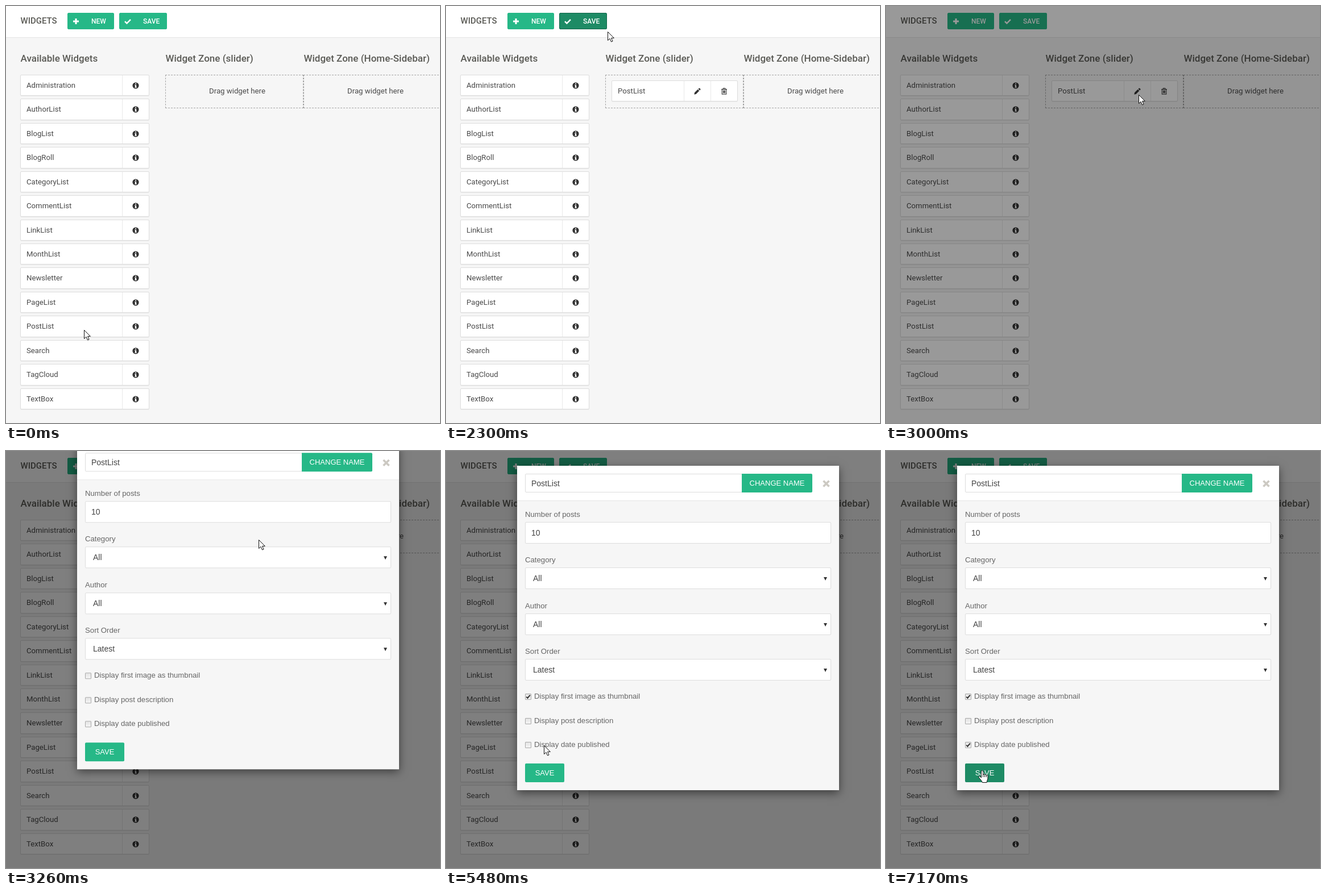
An HTML page that plays this animation: 763 by 734 pixels, repeating every 7.24 s.

```html
<!DOCTYPE html>
<html lang="en">
<head>
<meta charset="utf-8">
<title>Widgets</title>
<style>
  html, body { margin: 0; width: 100%; height: 100%; overflow: hidden; }
  #stage { position: relative; width: 763px; height: 734px; overflow: hidden; background: #f6f6f6;
    font: 13.2px Roboto, sans-serif; color: #4a4a4a; }
  #stage * { box-sizing: border-box; }
  #stage div, #stage svg { position: absolute; white-space: nowrap; }
  .header { left: 0; top: 0; width: 763px; height: 56px; background: #fff; border-bottom: 1px solid #e4e4e4; }
  .heading { font-weight: 500; font-size: 17px; line-height: 24px; top: 80px; color: #5a5a55; }
  .title { left: 25.5px; top: 14px; font-weight: 500; font-size: 15px; line-height: 24px; color: #5a5a55; }
  .btn { background: #26b887; color: #fff; border-radius: 2px; }
  .tool { top: 12px; height: 29px; font-weight: 500; font-size: 12px; line-height: 30px; border: 1px solid #26b887; }
  .tool div { top: -1px; }
  .tool svg { top: 8px; width: 12px; height: 12px; }
  .dark { background: #1e8b65; border-color: #12664a; }
  .card { height: 37.43px; line-height: 36px; background: #fff; border: 1px solid #ddd; border-radius: 2px;
    box-shadow: 0 1px 1px rgba(0, 0, 0, .05); }
  .card .name { left: 10px; top: 0; }
  .cell { top: 0; bottom: 0; width: 47px; border-left: 1px solid #e8e8e8; }
  .cell svg { left: 17px; top: 12px; width: 12px; height: 12px; }
  .zone { top: 121px; width: 243px; height: 59px; border: 1px dashed #a5a5a5; }
  .zone .hint { left: 10px; right: 0; bottom: 19px; line-height: 20px; text-align: center; }
  .slot { left: 291px; top: 131px; width: 222px; height: 38px; border: 1px dashed #a5a5a5; }
  #shade { inset: 0; background: #000; }
  #modal { left: 125px; top: 26px; width: 566px; height: 571px; background: #f6f6f6;
    box-shadow: 0 5px 15px rgba(0, 0, 0, .5); font: 13.2px "Liberation Sans", Arial, sans-serif; color: #666; }
  #modal .bar { left: 0; top: 0; width: 566px; height: 62px; background: #fff; border-bottom: 1px solid #e5e5e5; }
  .field { left: 14px; width: 538px; height: 38px; line-height: 37px; padding-left: 10px; font-size: 14px;
    color: #444; background: #fff; border: 1px solid #ddd; border-radius: 2px; }
  .select { padding-left: 13px; }
  .select::after { content: ""; position: absolute; right: 6px; top: 16px;
    border: 3px solid transparent; border-top: 6px solid #333; border-bottom: 0; }
  .label { left: 14px; line-height: 20px; }
  .check { left: 14px; width: 11px; height: 11px; border: 1px solid #a9a9a9; border-radius: 1px;
    background: linear-gradient(#e4e4e4, #f4f4f4); }
  .check svg { left: 0; top: 0; width: 9px; height: 9px; }
  .btn.big { text-align: center; font-size: 13px; line-height: 34px; height: 33px; }
  #spot { width: 23px; height: 23px; margin: -11.5px; border-radius: 50%; background: rgba(252, 245, 50, .8); }
  .pointer { overflow: visible; width: 18px; height: 23px; }
  .pointer path { fill: #fff; stroke: #111; stroke-linejoin: round; }
</style>
</head>
<body>
<svg width="0" height="0" style="position:absolute">
  <symbol id="info" viewBox="0 0 12 12"><circle cx="6" cy="6" r="5.6" fill="#333"/>
    <path d="M5 1.9h2.1v1.7H5zM4.3 4.7h2.8v3.8h.7v1.2H4.3V8.5H5V5.9h-.7z" fill="#fff"/></symbol>
  <symbol id="pencil" viewBox="0 0 12 12"><path d="M.3 11.7l.8-3.4 5.6-5.6 2.6 2.6-5.6 5.6zM7.5 1.9l1.2-1.2q.6-.5 1.2 0l1.4 1.4q.5.6 0 1.2l-1.2 1.2z" fill="#333"/></symbol>
  <symbol id="trash" viewBox="0 0 12 12"><path d="M1.2 2.6h9.6M4.3 2.4V.8h3.4v1.6M2.3 2.8v8.4h7.4V2.8M4.6 4.6v4.8M6 4.6v4.8M7.4 4.6v4.8" fill="none" stroke="#333" stroke-width="1.1"/></symbol>
  <symbol id="plus" viewBox="0 0 12 12"><path d="M6 1v10M1 6h10" stroke="#fff" stroke-width="3"/></symbol>
  <symbol id="tick" viewBox="0 0 12 12"><path d="M1 6.2l3.4 3.4L11 2.9" fill="none" stroke="#fff" stroke-width="2.5"/></symbol>
  <symbol id="mark" viewBox="0 0 9 9"><path d="M1.2 4.6l2.2 2.4L7.8 1.6" fill="none" stroke="#333" stroke-width="2"/></symbol>
</svg>
<div id="stage">
  <div class="header"></div>
  <div class="title">WIDGETS</div>
  <div class="btn tool" style="left:108px;width:82px"><svg style="left:8px"><use href="#plus"/></svg><div style="left:41px">NEW</div></div>
  <div class="btn tool" id="save" style="left:199px;width:84px"><svg style="left:8px"><use href="#tick"/></svg><div style="left:41px">SAVE</div></div>
  <div class="heading" style="left:25.5px">Available Widgets</div>
  <div class="heading" style="left:280.5px">Widget Zone (slider)</div>
  <div class="heading" style="left:523.5px">Widget Zone (Home-Sidebar)</div>
  <div id="list"></div>
  <div class="zone" id="zone" style="left:280px"><div class="hint" id="hint">Drag widget here</div></div>
  <div class="zone" style="left:523px"><div class="hint">Drag widget here</div></div>
  <div class="slot" id="slot"></div>
  <div id="cards"></div>
  <div id="shade"></div>
  <div id="modal"></div>
  <div id="spot"></div>
  <svg class="pointer" id="arrow"><path d="M.5.5V15.6L4 12.3 6.5 18 9 17 6.6 11.4H11.3Z"/></svg>
  <svg class="pointer" id="hand"><path d="M5.5 13V2.2a1.6 1.6 0 0 1 3.2 0V8a1.5 1.5 0 0 1 2.9.3 1.5 1.5 0 0 1 2.8.6 1.4 1.4 0 0 1 2.6.8V14c0 3-1.8 4-1.8 7.5H7.3C7 19 4 16.5 1.3 12.6c-1-1.6.8-2.8 2.1-1.6ZM8.7 8v4M11.6 8.5v3.5M14.4 9v3"/></svg>
</div>
<script>
const LOOP = 7240;
const $ = id => document.getElementById(id);
const show = (id, on) => { $(id).style.display = on ? "" : "none"; };
const move = (id, x, y) => { $(id).style.transform = `translate(${x}px,${y}px)`; };
const clamp = v => Math.max(0, Math.min(1, v));

// Static parts
const card = (name, x, y, width, icons, id = "") =>
  `<div class="card" id="${id}" style="left:${x}px;top:${y}px;width:${width}px"><div class="name">${name}</div>` +
  icons.map((icon, i) =>
    `<div class="cell" style="right:${47 * (icons.length - 1 - i)}px"><svg><use href="#${icon}"/></svg></div>`).join("") +
  "</div>";

const widgets = ("Administration AuthorList BlogList BlogRoll CategoryList CommentList LinkList " +
  "MonthList Newsletter PageList PostList Search TagCloud TextBox").split(" ");
$("list").innerHTML = widgets.map((name, i) => card(name, 25, 121 + i * 42.43, 227, ["info"])).join("");
$("cards").innerHTML = card("PostList", 291, 131, 222, ["pencil", "trash"], "placed") +
  card("PostList", 0, 0, 222, ["info"], "dragged");

const fields = [["Number of posts", "10"], ["Category", "All"], ["Author", "All"], ["Sort Order", "Latest"]];
const options = ["first image as thumbnail", "post description", "date published"];
$("modal").innerHTML =
  `<div class="bar"></div><div class="field" style="top:14px;width:382px;height:33px;line-height:32px">PostList</div>
   <div class="btn big" style="left:395px;top:14px;width:124px;border-radius:0 2px 2px 0">CHANGE NAME</div>
   <svg style="left:537px;top:25px" width="13" height="13"><path d="M1.5 1.5l10 10M11.5 1.5l-10 10" stroke="#ccc9c2" stroke-width="3.6"/></svg>` +
  fields.map(([label, value], i) => {
    const y = Math.round(99 + i * 80.3);
    return `<div class="label" style="top:${y - 23}px">${label}</div>
      <div class="field ${i ? "select" : ""}" style="top:${y}px">${value}</div>`;
  }).join("") +
  options.map((text, i) => {
    const y = Math.round(406 + i * 42.5);
    return `<div class="check" style="top:${y - 5}px"><svg id="mark${i}"><use href="#mark"/></svg></div>
      <div class="label" style="left:30px;top:${y - 10}px">Display ${text}</div>`;
  }).join("") +
  `<div class="btn big" id="submit" style="left:14px;top:524px;width:69px">SAVE</div>`;

const bursts = [[340, 1030, 12], [1150, 1150, 1], [1330, 1870, 9], [2300, 3000, 12], [3070, 3760, 12],
  [3830, 4530, 12], [4650, 4780, 2], [4970, 5480, 9], [5980, 6040, 2], [6220, 6690, 8], [6940, 7170, 3]];

function hold(t) {
  const burst = bursts.filter(b => t >= b[0]).pop();
  if (!burst) return 0;
  const [first, last, steps] = burst;
  const gap = (last - first) / (steps - 1) || 1;
  return Math.min(last, first + Math.floor((t - first) / gap + 1e-6) * gap);
}

// Pointer strokes: start, end, control point, destination
const strokes = [
  [280, 1030, [490, 270], [399, 147]],
  [1266, 1870, [335, 80], [278, 41]],
  [2236, 2810, [362, 99], [444, 156]],
  [3380, 4140, [303, 442], [133, 430]],
  [4200, 4530, [157, 433], [181, 434]],
  [4906, 5480, [179, 476], [172, 518]],
  [6153, 6690, [171, 540], [169, 562]]
];

function pointerAt(t) {
  let at = [137, 570];
  for (const [start, end, via, to] of strokes) {
    const p = clamp((t - start) / (end - start));
    const u = p * p * (3 - 2 * p), v = 1 - u;
    at = at.map((from, i) => v * v * from + 2 * u * v * via[i] + u * u * to[i]);
  }
  return at.map(Math.round);
}

const presses = [[340, 1150], [2800, 2900], [4650, 4780], [5980, 6040], [6940, 7100]];

function draw(now) {
  const t = hold(now % LOOP);
  const [x, y] = pointerAt(t);
  const dragging = t >= 340 && t < 1150;
  const placed = t >= 1150;
  const over = dragging && x > 281 && y < 215;

  $("save").classList.toggle("dark", t >= 340 && t < 2850);
  $("zone").style.height = over ? "106px" : "59px";
  $("hint").style.bottom = over ? "24px" : "19px";
  show("hint", !placed);
  show("slot", over);
  show("placed", placed);
  show("dragged", dragging);
  move("dragged", x - 112, y - 25);

  $("shade").style.opacity = 0.5 * clamp((t - 2880) / 150);
  const drop = clamp((t - 3093) / 300);
  $("modal").style.opacity = clamp((t - 3093) / 150);
  move("modal", 0, -143 * (1 - drop) ** 1.7);
  show("mark0", t >= 4780);
  show("mark1", false);
  show("mark2", t >= 6040);

  const onSubmit = t > 6000 && y >= 550;
  const onSave = t > 1200 && t < 2300 && x >= 199 && x < 283 && y < 42;
  $("submit").classList.toggle("dark", onSubmit);
  show("spot", presses.some(([from, to]) => t >= from && t < to));
  move("spot", x, y);
  show("arrow", !onSubmit && !onSave);
  show("hand", onSubmit || onSave);
  move("arrow", x, y);
  move("hand", x - 7, y);
}

function tick() {
  draw(performance.now());
  requestAnimationFrame(tick);
}
tick();
</script>
</body>
</html>
```
